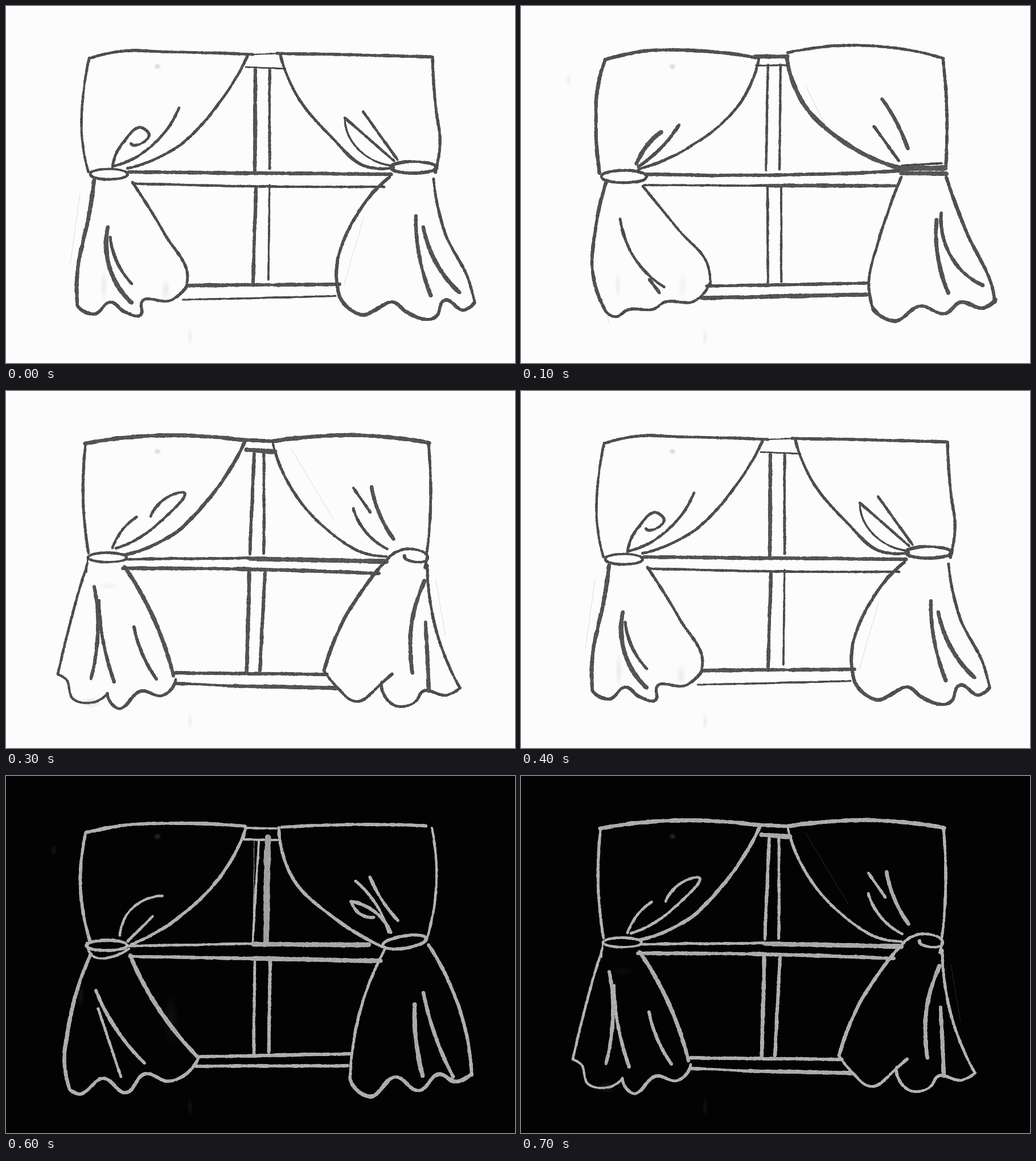
Write an HTML page with a canvas that moves like this. It is 894x626 px and loops after 0.8 s.

```html
<!DOCTYPE html>
<html lang="en">
<head>
<meta charset="utf-8">
<title>Charcoal window</title>
<style>
html, body { margin: 0; width: 100%; height: 100%; overflow: hidden; background: #fcfcfc; }
#stage { position: absolute; left: 0; top: 0; width: 894px; height: 626px; background: #fcfcfc; animation: negative 800ms step-end infinite; }
canvas { position: absolute; left: 0; top: 0; opacity: 0; animation: show 400ms step-end infinite; }
@keyframes show { 0% { opacity: 1; } 25%, 100% { opacity: 0; } }
@keyframes negative { 0% { filter: invert(0); } 75%, 100% { filter: invert(1); } }
</style>
</head>
<body>
<div id="stage"></div>
<script>
const W = 894, H = 626;
const stage = document.getElementById('stage');
let g, seed = 1;

function rnd() {
  seed = (seed * 1664525 + 1013904223) >>> 0;
  return seed / 4294967296;
}

function dab(x, y, r) {
  g.beginPath();
  g.arc(x, y, r, 0, 7);
  g.fill();
}

const unit = (x, y) => {
  const n = Math.hypot(x, y) || 1;
  return [x / n, y / n, n];
};

// Directions at each point; three points give close to a circular arc.
function tangents(p) {
  const legs = p.slice(1).map((q, i) => unit(q[0] - p[i][0], q[1] - p[i][1]));
  const last = legs.length - 1;
  const t = p.map((_, i) => {
    if (!i || i > last) return legs[i ? last : 0];
    const [a, b] = [legs[i - 1], legs[i]];
    return unit(a[0] * b[2] + b[0] * a[2], a[1] * b[2] + b[1] * a[2]);
  });
  const mirror = (m, u) => {
    const k = 2 * (m[0] * u[0] + m[1] * u[1]);
    return [k * u[0] - m[0], k * u[1] - m[1]];
  };
  if (last) {
    t[0] = mirror(t[1], legs[0]);
    t[last + 1] = mirror(t[last], legs[last]);
  }
  return { legs, t };
}

function hermite(a, b, m, n, s) {
  const s2 = s * s, s3 = s2 * s;
  return a + (b - a) * (3 * s2 - 2 * s3) + m * (s3 - 2 * s2 + s) + n * (s3 - s2);
}

// Charcoal line of width w through x, y pairs; widths under 1 are faint pencil.
function line(w, ...xy) {
  const p = [];
  for (let i = 0; i < xy.length; i += 2) p.push([xy[i], xy[i + 1]]);
  const { legs, t } = tangents(p);
  const faint = w < 1, tone = Math.round(44 + w * 3), shake = faint ? 0 : .5;
  g.fillStyle = faint ? 'rgba(90,90,90,.2)' : `rgb(${tone},${tone},${tone})`;
  let swell = 0, drift = 0;
  legs.forEach(([, , len], i) => {
    const at = (k, s) => hermite(p[i][k], p[i + 1][k], t[i][k] * len, t[i + 1][k] * len, s);
    for (let d = 0; d < len; d++) {
      swell = swell * .9 + (rnd() - .5) * .12;
      drift = drift * .97 + (rnd() - .5) * .2;
      const r = faint ? .6 : w / 2 * (.92 + swell + (rnd() - .5) * .24);
      dab(at(0, d / len) + drift + (rnd() - .5) * shake, at(1, d / len) + drift + (rnd() - .5) * shake, r);
    }
  });
}

function ring(w, x, y, rx, ry, tilt = 0) {
  const p = [];
  for (let i = 0; i <= 16; i++) {
    const a = i * Math.PI / 8, u = rx * Math.cos(a), v = ry * Math.sin(a);
    p.push(x + u * Math.cos(tilt) - v * Math.sin(tilt), y + u * Math.sin(tilt) + v * Math.cos(tilt));
  }
  line(w, ...p);
}

function grain() {
  const img = g.getImageData(0, 0, W, H);
  for (let i = 3; i < img.data.length; i += 4)
    if (img.data[i]) img.data[i] *= .8 + .2 * rnd();
  g.putImageData(img, 0, 0);
}

function smudge(x, y, rx, ry, a) {
  g.save();
  g.translate(x, y);
  g.scale(rx, ry);
  const soft = g.createRadialGradient(0, 0, 0, 0, 0, 1);
  soft.addColorStop(0, `rgba(110,110,110,${a})`);
  soft.addColorStop(1, 'rgba(110,110,110,0)');
  g.fillStyle = soft;
  dab(0, 0, 1);
  g.restore();
}

function sketchA() {
  // rail and sides
  line(5, 146, 92, 190, 81, 300, 81, 434, 85);
  line(4.5, 146, 91, 134, 180, 134, 235, 145, 291);
  line(2.5, 434, 85, 476, 83);
  line(5.5, 476, 83, 748, 89);
  line(5.5, 749, 90, 755, 180, 762, 235, 754, 292);
  // curtain edges and panes
  line(5, 424, 88, 372, 173, 296, 250, 212, 285);
  line(5, 482, 86, 508, 152, 570, 228, 635, 282, 680, 283);
  line(3, 421, 107, 491, 110);
  line(6.5, 438, 112, 437, 288);
  line(5, 463, 112, 463, 286);
  line(6, 439, 318, 434, 484);
  line(3.5, 463, 314, 461, 480);
  line(6.5, 216, 291, 676, 295);
  line(4.5, 222, 311, 434, 316, 664, 317);
  line(6.5, 320, 490, 586, 488);
  line(3.5, 310, 515, 580, 509);
  // left drape
  ring(4.5, 181, 295, 33, 9);
  line(5, 187, 282, 205, 240, 240, 214, 251, 224, 219, 241);
  line(5, 304, 178, 262, 240, 187, 282);
  line(7, 155, 305, 146, 365, 125, 470, 125, 525);
  line(5.5, 125, 525, 155, 540, 184, 519, 208, 536, 237, 541, 238, 520, 290, 516, 317, 492);
  line(5, 222, 309, 280, 402, 319, 475, 317, 492);
  line(7.5, 179, 388, 186, 470, 220, 520);
  line(5.5, 183, 405, 198, 455, 222, 488);
  // right drape
  ring(5.5, 716, 283, 40, 10);
  line(5, 627, 185, 688, 270);
  line(3.5, 595, 196, 600, 222, 680, 280);
  line(5, 595, 196, 682, 272);
  line(5.5, 674, 300, 608, 380, 580, 470, 586, 510);
  line(6, 586, 510, 622, 541, 685, 521, 700, 534, 755, 545, 770, 516, 805, 533, 823, 520);
  line(5, 751, 303, 770, 395, 814, 485, 823, 520);
  line(6.5, 720, 368, 726, 440, 746, 508);
  line(7, 733, 388, 750, 440, 797, 503);
  line(.7, 130, 330, 113, 450);
  line(.7, 628, 370, 594, 490);
  grain();
  smudge(172, 490, 7, 32, .12);
  smudge(281, 498, 9, 20, .12);
}

function sketchB() {
  line(6, 148, 94, 205, 81, 320, 79, 412, 90);
  line(6, 148, 94, 134, 150, 132, 205, 138, 294);
  line(7, 410, 89, 468, 88);
  line(5, 468, 82, 705, 82, 743, 92);
  line(5.5, 741, 92, 748, 190, 746, 280);
  // curtain edges and panes
  line(5, 418, 92, 388, 166, 300, 245, 205, 287);
  line(7.5, 467, 90, 494, 168, 565, 237, 665, 284);
  line(3.5, 413, 104, 468, 104);
  line(4.5, 434, 103, 430, 288);
  line(4.5, 456, 103, 454, 286);
  line(4.5, 433, 318, 434, 485);
  line(4, 457, 318, 457, 484);
  line(6, 220, 295, 520, 295, 667, 289);
  line(4, 216, 314, 434, 315);
  line(6.5, 434, 315, 658, 315);
  line(5.5, 326, 491, 608, 486);
  line(7, 316, 512, 608, 506);
  // left drape
  ring(5, 181, 299, 40, 11);
  line(7, 246, 221, 222, 244, 203, 277);
  line(5.5, 278, 208, 245, 250, 205, 282);
  line(6, 150, 308, 128, 410, 125, 460, 146, 530);
  line(5, 146, 530, 165, 545, 187, 533, 235, 530, 250, 520, 305, 517, 332, 485);
  line(4.5, 214, 316, 278, 394, 328, 455, 332, 488);
  line(5, 174, 373, 205, 450, 252, 493);
  line(6, 226, 480, 244, 504);
  // right drape
  line(4, 668, 280, 740, 276);
  line(9, 668, 285, 745, 284);
  line(8, 668, 293, 747, 294);
  line(6.5, 634, 163, 660, 205, 679, 250);
  line(5, 620, 211, 664, 272);
  line(5, 668, 300, 630, 405, 611, 495, 618, 530);
  line(6.5, 618, 530, 655, 552, 702, 526, 745, 539, 770, 520, 815, 529, 834, 515);
  line(6, 747, 300, 782, 395, 828, 495, 833, 520);
  line(7, 730, 375, 734, 450, 751, 504);
  line(6, 738, 363, 775, 465, 812, 490);
  line(.7, 500, 140, 535, 210);
  line(.7, 137, 500, 155, 556);
  grain();
  smudge(84, 130, 6, 10, .1);
  smudge(170, 490, 6, 28, .1);
  smudge(284, 490, 9, 28, .08);
}

function sketchC() {
  line(6, 140, 99, 200, 87, 310, 83, 420, 88);
  line(5.5, 140, 99, 131, 190, 147, 288);
  line(4, 423, 91, 478, 92);
  line(4.5, 421, 88, 418, 108);
  line(5.5, 484, 90, 640, 85, 738, 88);
  line(4.5, 748, 91, 754, 212, 738, 288);
  // curtain edges and panes
  line(5.5, 421, 92, 385, 165, 308, 245, 220, 296);
  line(5.5, 479, 90, 503, 178, 578, 250, 662, 300);
  line(4, 416, 111, 476, 112);
  line(4, 444, 114, 433, 294);
  line(1.3, 436, 114, 434, 240);
  line(11, 460, 107, 457, 290);
  line(5.5, 437, 326, 435, 486);
  line(6, 464, 324, 461, 484);
  line(4.5, 216, 298, 434, 294);
  line(8.5, 434, 295, 638, 296);
  line(6, 217, 316, 434, 320);
  line(8, 434, 320, 658, 324);
  line(6, 340, 492, 603, 487);
  line(6, 334, 509, 600, 508);
  // left drape
  ring(5.5, 177, 297, 36, 9);
  line(4.5, 142, 292, 148, 311, 205, 310, 216, 303);
  line(4.5, 200, 280, 218, 236, 275, 210);
  line(5, 258, 246, 214, 290);
  line(6.5, 149, 312, 110, 440, 103, 510, 112, 550);
  line(6, 112, 550, 125, 557, 172, 530, 210, 555, 245, 522, 285, 535, 338, 494);
  line(7, 218, 314, 268, 408, 338, 494);
  line(6, 158, 376, 205, 460, 244, 504);
  line(5, 162, 408, 202, 528);
  // right drape
  ring(5.5, 700, 291, 39, 11, -.15);
  line(5, 614, 184, 660, 243, 672, 275);
  line(5.5, 639, 177, 662, 220, 689, 254);
  line(6, 606, 220, 645, 236, 676, 275);
  line(6, 607, 221, 622, 242, 647, 248);
  line(5, 665, 304, 614, 445, 604, 530);
  line(6.5, 604, 530, 638, 562, 685, 528, 725, 552, 762, 523, 790, 536, 818, 522);
  line(6, 742, 296, 803, 430, 818, 525);
  line(7.5, 718, 400, 720, 460, 732, 526);
  line(6.5, 733, 380, 752, 450, 786, 528);
  line(.7, 645, 340, 615, 430);
  grain();
  smudge(84, 130, 6, 10, .12);
  smudge(131, 385, 7, 20, .13);
  smudge(290, 430, 14, 48, .09);
}

function sketchD() {
  line(7, 138, 92, 220, 81, 340, 79, 420, 86);
  line(5, 140, 92, 136, 200, 145, 285);
  line(6.5, 422, 86, 470, 88);
  line(7, 470, 88, 580, 78, 744, 91);
  line(5, 742, 92, 746, 190, 739, 285);
  line(4, 468, 88, 472, 106);
  // curtain edges and panes
  line(6, 420, 88, 352, 194, 300, 246, 208, 287);
  line(5, 473, 108, 558, 238, 640, 287, 668, 290);
  line(8, 422, 103, 473, 107);
  line(5.5, 436, 108, 428, 286);
  line(5, 453, 108, 453, 286);
  line(6.5, 427, 318, 423, 492);
  line(6, 455, 318, 446, 490);
  line(5, 210, 295, 428, 293);
  line(8, 428, 294, 668, 299);
  line(6.5, 205, 311, 440, 313, 655, 320);
  line(6, 298, 494, 564, 497);
  line(5, 296, 513, 400, 517);
  line(7, 400, 517, 580, 521);
  // left drape
  ring(4.5, 178, 292, 34, 8);
  line(3, 144, 290, 141, 318);
  line(5, 187, 275, 204, 245, 230, 221);
  line(5, 254, 220, 290, 183, 309, 178, 270, 230, 193, 276);
  line(4.5, 143, 302, 113, 405, 91, 497);
  line(4.5, 91, 497, 104, 504, 118, 540, 178, 530);
  line(5.5, 178, 530, 195, 556, 238, 526, 275, 534, 298, 504);
  line(7, 208, 308, 260, 400, 294, 500);
  line(6.5, 155, 343, 161, 430, 149, 506);
  line(6, 163, 368, 172, 445, 190, 510);
  line(6, 225, 414, 240, 462, 265, 506);
  // right drape
  line(5, 668, 297, 710, 277, 741, 292, 700, 288);
  line(5, 740, 290, 736, 310);
  line(5, 610, 170, 640, 213);
  line(6.5, 642, 168, 658, 220, 681, 260);
  line(5, 610, 206, 640, 256, 670, 277);
  line(6, 668, 297, 600, 390, 558, 490);
  line(5, 558, 490, 582, 520, 612, 544, 660, 512, 678, 496);
  line(5, 660, 510, 685, 552, 722, 542, 730, 528, 775, 533, 798, 520);
  line(5, 740, 305, 745, 370, 798, 522);
  line(7, 735, 333, 714, 400, 714, 495);
  line(7, 737, 405, 743, 526);
  line(.7, 500, 100, 575, 225);
  line(.7, 755, 330, 772, 430);
  grain();
  smudge(150, 546, 18, 10, .2);
  smudge(180, 342, 20, 7, .08);
}

[sketchA, sketchB, sketchC, sketchD].forEach((sketch, i) => {
  const sheet = document.createElement('canvas');
  sheet.width = W;
  sheet.height = H;
  sheet.style.animationDelay = i * 100 - 400 + 'ms';
  g = sheet.getContext('2d', { willReadFrequently: true });
  sketch();
  smudge(266, 106, 7, 6, .3);
  smudge(323, 580, 5, 17, .11);
  stage.append(sheet);
});
</script>
</body>
</html>
```
